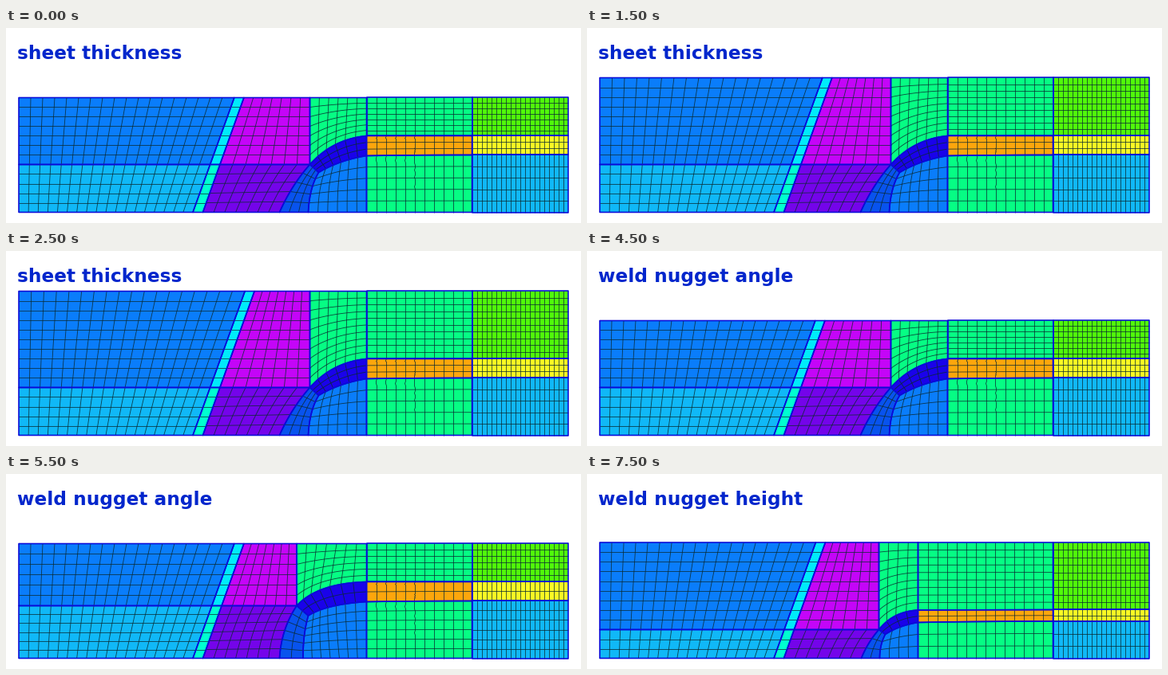
Animation of 720x245 px, one loop 8 s. Source, as a matplotlib script:

```python
import numpy as np
import matplotlib.pyplot as plt
from matplotlib.animation import FuncAnimation
from matplotlib.collections import LineCollection, PolyCollection

W, H, DPI = 720, 245, 100
PX = 72 / DPI
LEFT, RIGHT, BOTTOM = 15.5, 703.5, 231
SHEET_X = 583
CELL = 12

BLUE, SKY, CYAN, TEAL = "#0a7dfb", "#10b8f7", "#00ebfa", "#00ffd0"
MAGENTA, PURPLE, COBALT, NAVY = "#c405f8", "#7404ea", "#0853ee", "#1a02ea"
GREEN, ORANGE, LIME, YELLOW = "#06fd84", "#fda60c", "#50fa0a", "#fcfa24"
EDGE, MESH, TITLE = "#0a0ad8", "#0a2a30", "#0226cc"

# Rows: corner, inner corner, top end, lower end, then the control points of
# the upper, lower, left and inner arcs, then the feet of the last two arcs.
BASE = np.array([(380, 171), (391, 181), (451, 135), (451, 160), (408.5, 139),
                 (417, 165.5), (357, 197), (379.5, 200), (342, 231), (378, 231)])
FLAT = np.array([(347, 159), (365, 174), (451, 135), (451, 160), (371, 134),
                 (384, 161), (331.5, 191), (363, 203), (342, 231), (365, 231)])
LOW = np.array([(365, 195), (373, 201), (414, 170.5), (414, 186), (383, 172),
                (390, 190), (351, 211), (366, 214), (343, 231), (366, 231)])


def angled(t):
    return BASE + t * (FLAT - BASE)


# title, top of the sheet, nugget shape, gap lines at the right, layers
STATES = [("sheet thickness", top, BASE, (135, 159), 3)
          for top in (87, 74.5, 62, 50)]
STATES += [("weld nugget angle", 87, angled(t), (135, 159), n)
           for t, n in ((-0.5, 3), (0, 3), (0.5, 2), (1, 2))]
STATES += [("weld nugget height", 85.5, LOW, (170, 184.5), 2)]


def curve(pts, t):
    """Straight line or quadratic arc through two or three points."""
    p = np.asarray(pts, float)
    t = np.asarray(t)[..., None]
    if len(p) == 2:
        return (1 - t) * p[0] + t * p[1]
    return (1 - t) ** 2 * p[0] + 2 * t * (1 - t) * p[1] + t ** 2 * p[2]


def coons(top, bottom, left, right, u, v):
    u, v = np.broadcast_arrays(u, v)
    a, b = u[..., None], v[..., None]
    tl, tr, bl, br = (np.asarray(p, float)
                      for p in (top[0], top[-1], bottom[0], bottom[-1]))
    ruled = ((1 - b) * curve(top, u) + b * curve(bottom, u)
             + (1 - a) * curve(left, v) + a * curve(right, v))
    corners = ((1 - b) * ((1 - a) * tl + a * tr)
               + b * ((1 - a) * bl + a * br))
    return ruled - corners


def band_x(y):
    """Both sides of the slanted strip at height y."""
    d = BOTTOM - y
    return 233.5 + 0.36 * d, 246 + 0.357 * d


def blocks(top, shape, gap, layers):
    """Yield colour, top, bottom, left, right, columns, rows of each block."""
    p, q, e, f, c_up, c_low, c_left, c_in, foot, foot_in = map(tuple, shape)
    mid, ex = p[1], e[0]
    upper, lower = (p, c_up, e), (q, c_low, f)
    outer, inner = (p, c_left, foot), (q, c_in, foot_in)
    rows = round((mid - top) / CELL)
    low_rows = round((BOTTOM - mid) / CELL)
    arc_cols = round((ex - p[0]) / CELL)
    mid_cols = round((SHEET_X - ex) / CELL)

    def quad(color, tl, tr, bl, br, cols, n):
        return color, (tl, tr), (bl, br), (tl, bl), (tr, br), cols, n

    xs = [band_x(y) for y in (top, mid, BOTTOM)]
    for k, (y0, y1, n, fill, strip) in enumerate((
            (top, mid, rows, BLUE, CYAN),
            (mid, BOTTOM, low_rows, SKY, TEAL))):
        (a0, b0), (a1, b1) = xs[k], xs[k + 1]
        yield quad(fill, (LEFT, y0), (a0, y0), (LEFT, y1), (a1, y1), 18, n)
        yield quad(strip, (a0, y0), (b0, y0), (a1, y1), (b1, y1), 1, n)

    b_top, b_mid, b_low = (x[1] for x in xs)
    yield quad(MAGENTA, (b_top, top), (p[0], top), (b_mid, mid), p, 7, rows)
    yield (PURPLE, ((b_mid, mid), p), ((b_low, BOTTOM), foot),
           ((b_mid, mid), (b_low, BOTTOM)), outer, 7, low_rows)
    yield (COBALT, (p, q), (foot, foot_in), outer, inner, layers, low_rows)
    yield (NAVY, upper, lower, (p, q), (e, f), arc_cols, layers)
    yield (GREEN, ((p[0], top), (ex, top)), upper,
           ((p[0], top), p), ((ex, top), e), arc_cols, rows)
    yield (BLUE, lower, (foot_in, (ex, BOTTOM)), inner,
           (f, (ex, BOTTOM)), arc_cols, low_rows)

    g0, g1 = (SHEET_X, gap[0]), (SHEET_X, gap[1])
    under = (f, ((ex + SHEET_X) / 2, gap[1]), g1)
    yield quad(GREEN, (ex, top), (SHEET_X, top), e, g0, mid_cols, rows)
    yield (ORANGE, (e, g0), under, (e, f), (g0, g1), mid_cols, layers)
    yield (GREEN, under, ((ex, BOTTOM), (SHEET_X, BOTTOM)),
           (f, (ex, BOTTOM)), (g1, (SHEET_X, BOTTOM)), mid_cols, low_rows)

    ys = (top, *gap, BOTTOM)
    for y0, y1, n, fill in zip(ys, ys[1:], (rows, layers, low_rows),
                               (LIME, YELLOW, SKY)):
        yield quad(fill, (SHEET_X, y0), (RIGHT, y0),
                   (SHEET_X, y1), (RIGHT, y1), 20, n)


def build(state):
    title, *geometry = state
    polys, fills, lines = [], [], []
    for fill, *sides, cols, rows in blocks(*geometry):
        top, bottom, left, right = sides
        straight = all(len(s) == 2 for s in sides)
        t = np.linspace(0, 1, 2 if straight else 25)
        # Each side drops its last point, which starts the next side.
        polys.append(np.vstack([curve(s, d)[:-1] for s, d in (
            (top, t), (right, t), (bottom, t[::-1]), (left, t[::-1]))]))
        fills.append(fill)
        lines += [coons(*sides, i / cols, t) for i in range(1, cols)]
        lines += [coons(*sides, t, j / rows) for j in range(1, rows)]
    return title, polys, fills, lines


scenes = [build(s) for s in STATES]

fig = plt.figure(figsize=(W / DPI, H / DPI), dpi=DPI, facecolor="white")
ax = fig.add_axes([0, 0, 1, 1])
ax.set_xlim(-0.5, W - 0.5)
ax.set_ylim(H - 0.5, -0.5)
ax.axis("off")

faces = ax.add_collection(PolyCollection([], edgecolors="none", zorder=1),
                          autolim=False)
mesh = ax.add_collection(LineCollection([], colors=MESH, linewidths=0.85 * PX,
                                        alpha=0.85, zorder=2), autolim=False)
edges = ax.add_collection(PolyCollection([], facecolors="none",
                                         edgecolors=EDGE, zorder=3,
                                         linewidths=1.6 * PX), autolim=False)
label = ax.text(14, 38.5, "", color=TITLE, fontsize=23.2 * PX,
                family="DejaVu Sans", weight="bold", va="baseline")


def update(i):
    title, polys, fills, lines = scenes[(i + 1) // 2]
    label.set_text(title)
    faces.set_verts(polys)
    faces.set_facecolor(fills)
    mesh.set_segments(lines)
    edges.set_verts(polys)
    return faces, mesh, edges, label


anim = FuncAnimation(fig, update, frames=16, interval=500, repeat=True,
                     repeat_delay=0, init_func=lambda: update(0))
plt.show()
```
